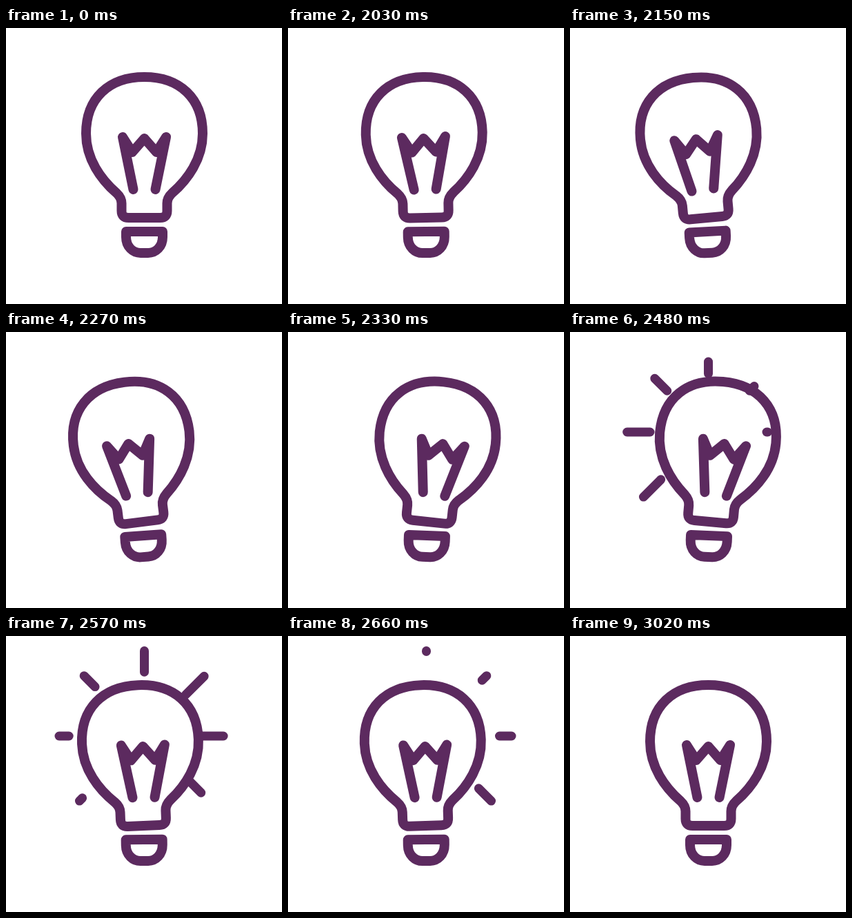
These frames come from a looping animation (400x400 px, 3080 ms). An HTML page:

```html
<!DOCTYPE html>
<html lang="en">
<head>
<meta charset="utf-8">
<title>Light bulb</title>
<style>
  html, body { margin: 0; width: 100%; height: 100%; overflow: hidden; background: #fff; }
  svg { display: block; width: 100%; height: 100%; }
</style>
</head>
<body>
<svg viewBox="0 0 400 400" fill="none" stroke="#5c2a5f" stroke-width="14" stroke-linecap="round" stroke-linejoin="round">
  <path id="cup" d="M174 295H227V303C227 317 217 326 206 326H195C184 326 174 317 174 303Z"/>
  <path id="glass" d="M200.5 71C149 71 116 102 116 153C116 190 138 220 160 239Q167.5 246 167.5 254V265Q167.5 275 177.5 275H223.5Q233.5 275 233.5 265V254Q233.5 246 241 239C263 220 285 190 285 153C285 102 252 71 200.5 71Z"/>
  <path id="filament" d="M184.5 234L169 158L183 180L200.5 160L218 180L232 158L216.5 234"/>
  <g id="rays" stroke-width="13"></g>
</svg>
<script>
const LOOP = 3080, START = 2030, STEP = 30;
const CENTER = { x: 200.5, y: 145 };
const RAY_LENGTH = 39;
const KEY_TIMES = [2000, 2270, 2390, 2540, 3020];

// Each part swings about its own pivot height, by its own angles at the key times.
const parts = [
  { id: 'cup', pivot: 320, angles: [0, -4, 8.4, -0.8, 0] },
  { id: 'glass', pivot: 305, angles: [0, -7.1, 19.4, -2.3, 0] },
  { id: 'filament', pivot: 297, angles: [0, -9.7, 29.8, -0.9, 0] }
].map(part => ({ ...part, node: document.getElementById(part.id) }));

const raysGroup = document.getElementById('rays');
const rays = Array.from({ length: 7 }, (_, i) => {
  const node = document.createElementNS('http://www.w3.org/2000/svg', 'path');
  raysGroup.append(node);
  return {
    node,
    angle: (135 + 45 * i) * Math.PI / 180,
    begin: 2350 + 25 * i,
    inner: i % 6 ? 84.5 : 94
  };
});

const clamp = v => Math.min(1, Math.max(0, v));
const sineOut = p => Math.sin(p * Math.PI / 2);
const sineInOut = p => (1 - Math.cos(p * Math.PI)) / 2;

function swing(angles, t) {
  if (t < START || t >= KEY_TIMES[4]) return 0;
  const i = KEY_TIMES.findIndex(k => k > t) - 1;
  const p = (t - KEY_TIMES[i]) / (KEY_TIMES[i + 1] - KEY_TIMES[i]);
  return angles[i] + (angles[i + 1] - angles[i]) * (i ? sineInOut : sineOut)(p);
}

function point(angle, radius) {
  const x = CENTER.x + radius * Math.cos(angle);
  const y = CENTER.y + radius * Math.sin(angle);
  return `${x.toFixed(2)} ${y.toFixed(2)}`;
}

function drawRay({ node, angle, begin, inner }, t) {
  const age = t - begin;
  const head = clamp(age / 123), tail = clamp((age - 120) / 118);
  node.setAttribute('d', head > tail
    ? `M${point(angle, inner + RAY_LENGTH * tail)}L${point(angle, inner + RAY_LENGTH * head)}`
    : '');
}

function draw(ms) {
  const time = ms % LOOP;
  const t = time < START ? 0 : START + Math.floor((time - START) / STEP) * STEP;
  for (const { node, pivot, angles } of parts) {
    node.setAttribute('transform', `rotate(${swing(angles, t).toFixed(3)} ${CENTER.x} ${pivot})`);
  }
  rays.forEach(ray => drawRay(ray, t));
}

let origin;
function tick(now) {
  origin ??= now;
  draw(now - origin);
  requestAnimationFrame(tick);
}
draw(0);
requestAnimationFrame(tick);
</script>
</body>
</html>
```
